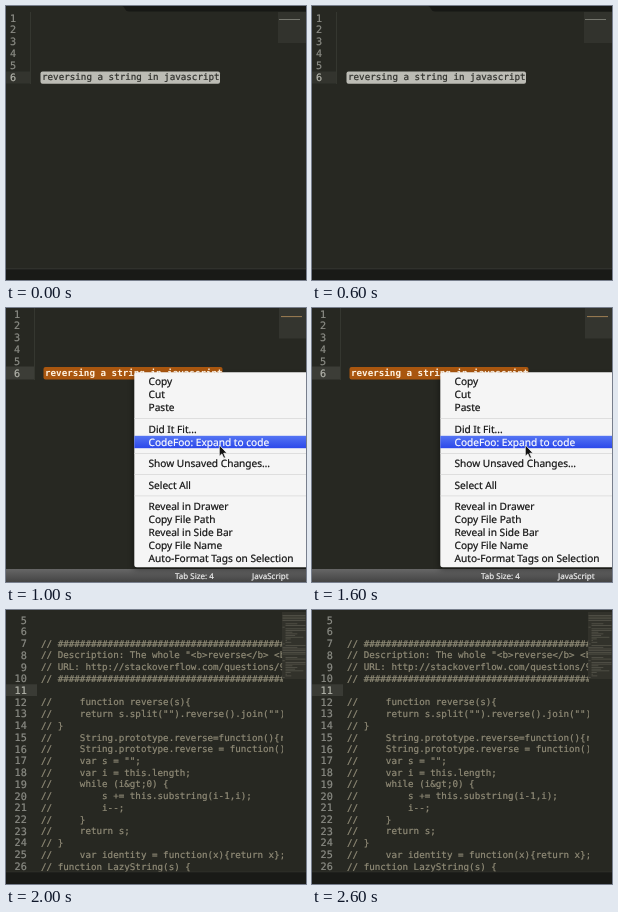
An HTML page that plays this animation: 300x274 px, repeating every 3000 ms.

```html
<!DOCTYPE html>
<html lang="en">
<head>
<meta charset="utf-8">
<title>Snippet expansion</title>
<style>
html, body { margin: 0; width: 100%; height: 100%; overflow: hidden; background: #272822; }
svg { display: block; width: 100vw; height: 100vh; }
text { white-space: pre; text-rendering: geometricPrecision; }
.code { font: 9.22px "DejaVu Sans Mono", monospace; }
.strong { font-weight: bold; }
.num { font: 10.2px "DejaVu Sans Mono", monospace; }
.menu { font: 10.15px "Noto Sans", sans-serif; }
.status { font: 8px "Noto Sans", sans-serif; }
</style>
</head>
<body>
<svg id="stage" viewBox="0 0 300 274" preserveAspectRatio="none">
  <defs>
    <linearGradient id="blue" x2="0" y2="1">
      <stop stop-color="#5575f3"/><stop offset="1" stop-color="#2c48ea"/>
    </linearGradient>
    <linearGradient id="bar" x2="0" y2="1">
      <stop stop-color="#666"/><stop offset="1" stop-color="#444"/>
    </linearGradient>
    <filter id="soft" x="-10%" y="-10%" width="120%" height="120%">
      <feGaussianBlur stdDeviation="3"/>
    </filter>
    <clipPath id="pane"><rect width="277" height="262"/></clipPath>
  </defs>
</svg>
<script>
const stage = document.getElementById("stage");
const HOLD = 1000;
const BG = "#272822", DIM = "#8c8d86", LIT = "#b4b5ac";
const PHRASE = "reversing a string in javascript";

function add(parent, tag, attrs, content) {
  const el = document.createElementNS("http://www.w3.org/2000/svg", tag);
  for (const key in attrs) el.setAttribute(key, attrs[key]);
  if (content !== undefined) el.textContent = content;
  parent.appendChild(el);
  return el;
}

const rect = (g, x, y, width, height, fill, more) =>
  add(g, "rect", { x, y, width, height, fill, ...more });

// a hairline stroke gives the slightly heavy desktop text weight
const label = (g, cls, x, y, fill, content, more) =>
  add(g, "text", { class: cls, x, y, fill, stroke: fill, "stroke-width": 0.2, ...more }, content);

function scene() {
  const g = add(stage, "g", { visibility: "hidden" });
  rect(g, 0, 0, 300, 274, BG);
  return g;
}

function numbers(g, first, last, right, y, step, active) {
  for (let n = first; n <= last; n++) {
    label(g, "num", right, y + (n - first) * step, n === active ? LIT : DIM, n, { "text-anchor": "end" });
  }
}

function selectedView() {
  const g = scene();
  add(g, "path", { d: "M116 0 Q118 0 119 3 Q120 5.5 123 5.5 H300 V0Z", fill: "#171815" });
  rect(g, 0, 65.5, 24, 12, "#33342e");
  rect(g, 24, 6, 0.8, 72, "#3a3b35");
  numbers(g, 1, 6, 10.2, 15.5, 11.85, 6);
  rect(g, 34.5, 65.5, 179.5, 12.2, "#bcbcb5", { rx: 2 });
  label(g, "code", 36, 74.3, "#2d2e2a", PHRASE);
  rect(g, 272, 6, 28, 31, "#32332d");
  rect(g, 273, 13, 21, 1, "#75766e");
  rect(g, 0, 263, 300, 11, "#191a17");
  rect(g, 0, 262.5, 300, 0.8, "#3a3b36");
  return g;
}

function menuView() {
  const g = scene();
  rect(g, 0, 58.5, 28, 13, "#3c3d37");
  rect(g, 28, 0, 0.8, 72, "#3a3b35");
  numbers(g, 1, 6, 14.2, 9.6, 11.8, 6);
  rect(g, 37.5, 59, 179, 12.5, "#a9560f", { rx: 2 });
  label(g, "code strong", 39, 68.2, "#fff3e2", PHRASE, { "stroke-width": 0 });
  rect(g, 273, 0, 27, 30.5, "#34352f");
  rect(g, 275, 8, 21, 1.1, "#94774f");
  rect(g, 0, 261, 300, 13, "url(#bar)");
  label(g, "status", 169, 271, "#f0f0f0", "Tab Size: 4");
  label(g, "status", 246, 271, "#f0f0f0", "JavaScript");

  rect(g, 128, 68, 180, 193, "#000", { opacity: 0.5, filter: "url(#soft)" });
  rect(g, 128.3, 64.3, 180, 195, "#f5f5f5", { rx: 2.5 });
  rect(g, 128.3, 127.8, 172, 12.4, "url(#blue)");
  for (const y of [110, 145, 166, 187.5]) rect(g, 128.3, y, 172, 0.8, "#d9d9d9");
  const items = [
    [73, "Copy"], [86.2, "Cut"], [99.3, "Paste"],
    [121, "Did It Fit..."], [134, "CodeFoo: Expand to code"],
    [155.5, "Show Unsaved Changes…"], [177, "Select All"],
    [198.5, "Reveal in Drawer"], [211.3, "Copy File Path"],
    [224.3, "Reveal in Side Bar"], [237.3, "Copy File Name"],
    [250.3, "Auto-Format Tags on Selection"]
  ];
  for (const [y, name] of items) {
    label(g, "menu", 142.5, y + 3.6, y === 134 ? "#fff" : "#111", name);
  }
  add(g, "path", {
    d: "M213.3 137 V148.2 L215.9 145.9 L217.8 150.2 L219.5 149.4 L217.7 145.2 H221Z",
    fill: "#111", stroke: "#fff", "stroke-width": 0.7
  });
  return g;
}

const CODE = [
  "// " + "#".repeat(45),
  '// Description: The whole "<b>reverse</b> <b',
  "// URL: http://stackoverflow.com/questions/9",
  "// " + "#".repeat(45),
  "",
  "//     function reverse(s){",
  '//     return s.split("").reverse().join("")',
  "// }",
  "//     String.prototype.reverse=function(){r",
  "//     String.prototype.reverse = function()",
  '//     var s = "";',
  "//     var i = this.length;",
  "//     while (i&gt;0) {",
  "//         s += this.substring(i-1,i);",
  "//         i--;",
  "//     }",
  "//     return s;",
  "// }",
  "//     var identity = function(x){return x};",
  "// function LazyString(s) {"
];

function codeView() {
  const g = scene();
  const step = 11.73, top = 13.2;
  rect(g, 0, 74.3, 31, 11.7, "#3a3b35");
  numbers(g, 5, 26, 20.8, top + 0.4, step, 11);
  const pane = add(g, "g", { "clip-path": "url(#pane)" });
  CODE.forEach((line, i) => label(pane, "code", 35, top + (i + 2) * step, "#918c78", line));
  rect(g, 276, 2, 24, 67, "#33342d", { opacity: 0.9 });
  // tiny overview: one thin stroke per code line
  for (let i = 0; i < 38; i++) {
    const line = CODE[i % CODE.length];
    const indent = line.startsWith("//  ") ? 3 : 0;
    const width = Math.min(23 - indent, line.length * 0.55 - indent);
    if (width > 0) rect(g, 276.5 + indent, 5 + i * 1.68, width, 0.8, "#55544a");
  }
  rect(g, 0, 262, 300, 12, "#191a17");
  rect(g, 0, 261.5, 300, 0.8, "#30312b");
  return g;
}

const views = [selectedView(), menuView(), codeView()];

function draw(time) {
  const now = Math.floor(time / HOLD) % views.length;
  views.forEach((g, i) => g.setAttribute("visibility", i === now ? "visible" : "hidden"));
}

const start = performance.now();
function tick() {
  draw(performance.now() - start);
  requestAnimationFrame(tick);
}
tick();
</script>
</body>
</html>
```
